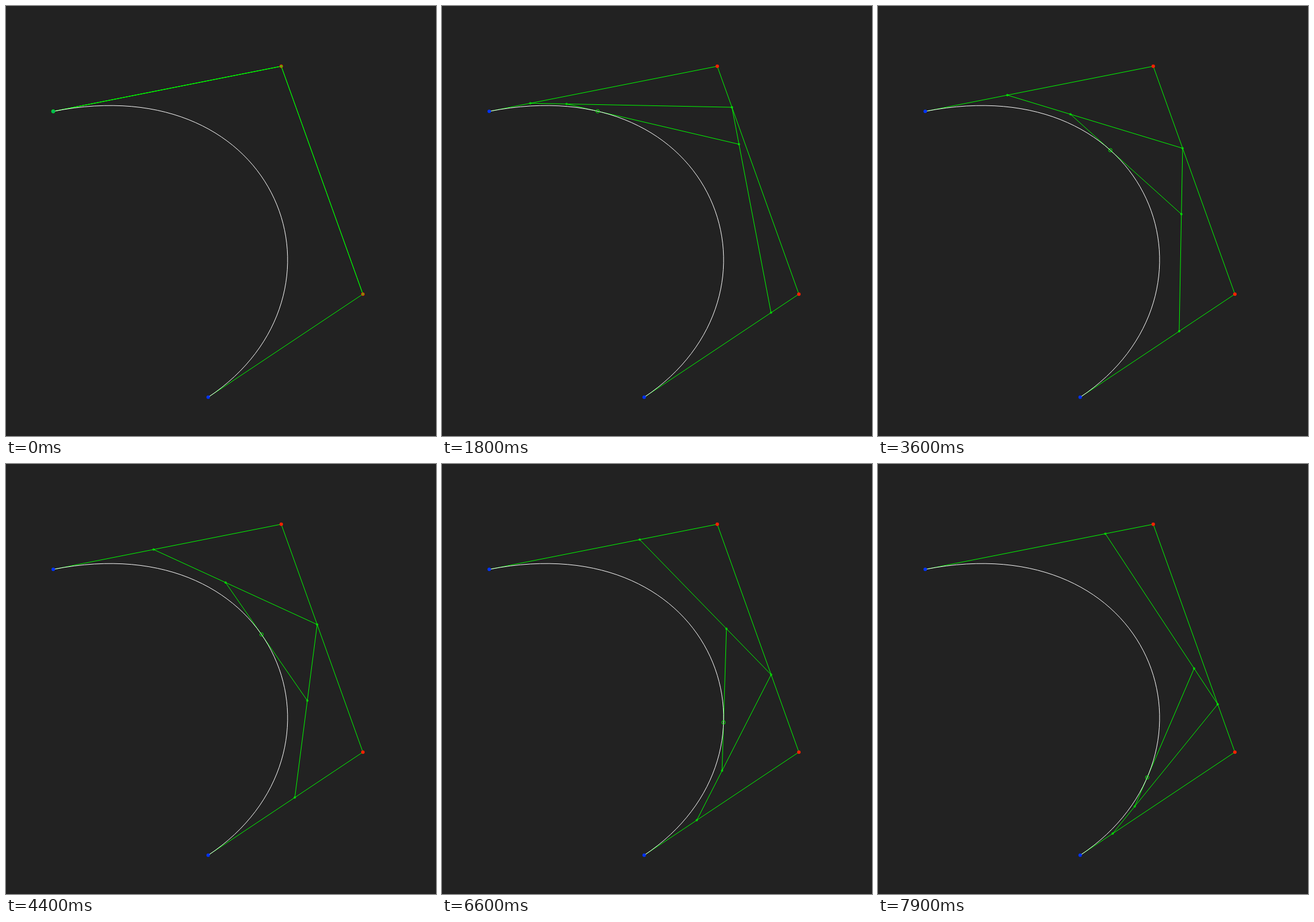
An HTML page with a canvas that plays this animation: 748 px wide and 748 px high, repeating every 8 s.

```html
<!DOCTYPE html>
<html lang="en">
<head>
<meta charset="utf-8">
<title>Cubic curve construction</title>
<style>
  html, body { margin: 0; width: 100%; height: 100%; overflow: hidden; background: #222; }
  canvas { display: block; }
</style>
</head>
<body>
<canvas id="stage" width="748" height="748"></canvas>
<script>
const ctx = document.getElementById('stage').getContext('2d');
const LOOP = 8000, STEP = 100;
const GREEN = '#0f0', BLUE = '#03f', RED = '#f20';
const anchors = [[82.2, 183.3], [478.8, 104.8], [620.8, 501.2], [351.7, 680.6]];

const mix = (a, b, t) => a.map((v, i) => v + (b[i] - v) * t);
const between = (pts, t) => pts.slice(1).map((p, i) => mix(pts[i], p, t));

function line(a, b) {
  ctx.beginPath();
  ctx.moveTo(...a);
  ctx.lineTo(...b);
  ctx.stroke();
}

function circle([x, y], r) {
  ctx.beginPath();
  ctx.arc(x, y, r, 0, Math.PI * 2);
}

function dot(p, color) {
  ctx.fillStyle = color;
  circle(p, 3);
  ctx.fill();
}

function ring(p, r) {
  circle(p, r);
  ctx.stroke();
}

function draw(t) {
  ctx.fillStyle = '#222';
  ctx.fillRect(0, 0, 748, 748);
  ctx.lineWidth = 1;

  // De Casteljau levels: 4, 3, 2 and finally 1 point
  const levels = [anchors];
  while (levels.length < 4) levels.push(between(levels[levels.length - 1], t));

  ctx.strokeStyle = GREEN;
  for (const pts of levels) {
    pts.slice(1).forEach((p, i) => line(pts[i], p));
  }

  ctx.strokeStyle = '#fff';
  ctx.beginPath();
  ctx.moveTo(...anchors[0]);
  ctx.bezierCurveTo(...anchors.slice(1).flat());
  ctx.stroke();

  anchors.forEach((p, i) => dot(p, i % 3 ? RED : BLUE));

  ctx.strokeStyle = GREEN;
  [...levels[1], ...levels[2]].forEach(p => ring(p, 1.5));
  ring(levels[3][0], 3);
}

const start = performance.now();
function tick() {
  const time = (performance.now() - start) % LOOP;
  draw(Math.floor(time / STEP) / 100);
  requestAnimationFrame(tick);
}
tick();
</script>
</body>
</html>
```
